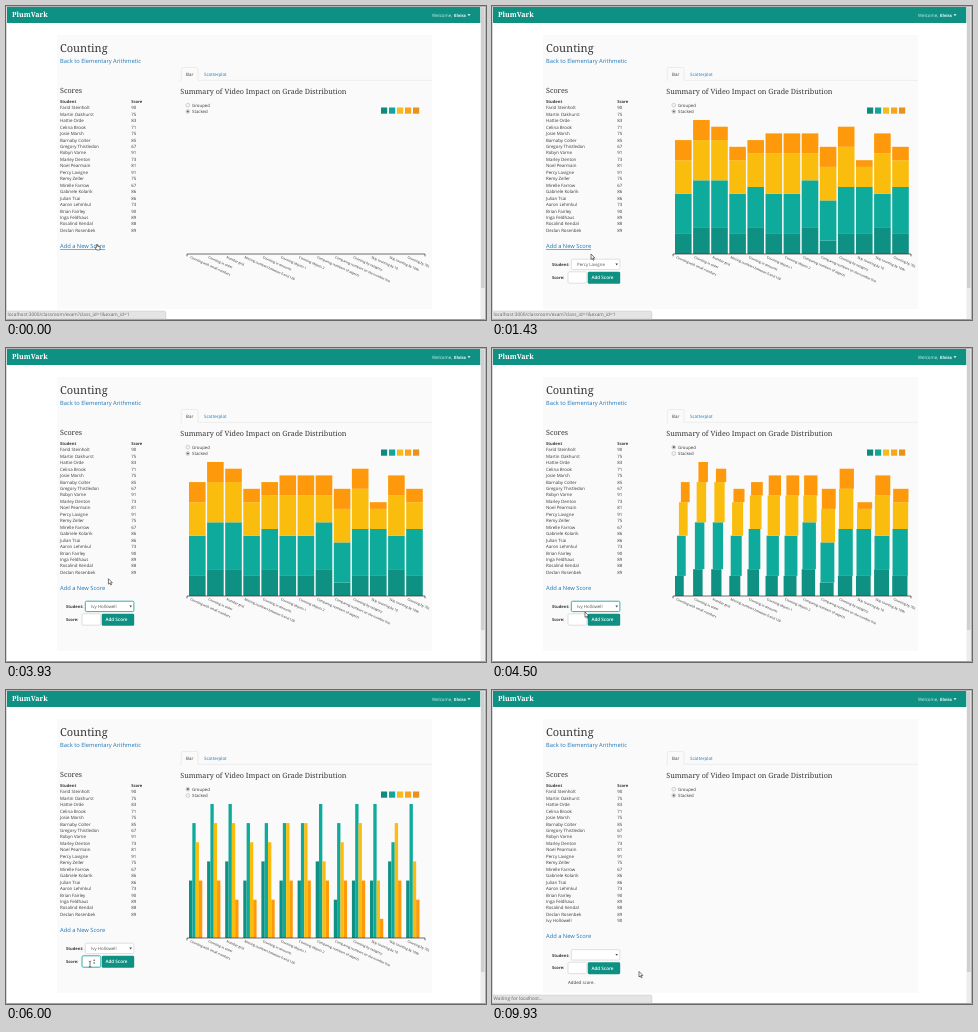
Animation of 480 by 314 pixels, one loop 10 s. Source, as an HTML page with a canvas:

```html
<!DOCTYPE html>
<html lang="en">
<head>
<meta charset="utf-8">
<title>Class scores</title>
<style>
html, body { margin: 0; width: 100%; height: 100%; overflow: hidden; background: #fff; }
canvas, svg { position: absolute; left: 0; top: 0; width: 480px; height: 314px; }
text { font-family: "Open Sans", sans-serif; text-rendering: geometricPrecision; white-space: pre; }
.serif { font-family: "Noto Serif", serif; font-weight: 500; }
</style>
</head>
<body>
<canvas id="chart"></canvas>
<svg id="ui" viewBox="0 0 480 314"></svg>
<script>
const LOOP = 10000, BASE = 248, X0 = 183, STEP = 18.1, BAR = 16.6, LEVELS = 5;
const INK = '#383838', LINK = '#1c76b8', TEAL = '#0e9183';
const COLORS = ['#0e9183', '#0eaa9b', '#fabc0d', '#fd990b'];
// Counts per topic; the fifth level is empty throughout
const DATA = ['3653', '4763', '4762', '3652', '4652', '3663', '3663',
  '4743', '2653', '3763', '3731', '4563', '3742'].map(s => [...s].map(Number));
const TOPICS = ['Counting with small numbers', 'Counting in order', 'Number grid',
  'Missing numbers between 0 and 120', 'Counting in amounts', 'Counting objects 1',
  'Counting objects 2', 'Comparing numbers of objects', 'Comparing numbers on the number line',
  'Counting by category', 'Skip counting by 10', 'Skip counting by 100s', 'Counting by 70s'];
const SCORES = [['Farid Steinholt', 90], ['Martin Oakhurst', 75], ['Hattie Orde', 83],
  ['Celina Brook', 71], ['Josie Marsh', 75], ['Barnaby Colter', 85], ['Gregory Thistledon', 67],
  ['Robyn Varne', 91], ['Marley Denton', 73], ['Noel Pearmain', 81], ['Percy Lavigne', 91],
  ['Remy Zeller', 75], ['Mirelle Farrow', 67], ['Gabriele Kolarik', 86], ['Julian Tsai', 86],
  ['Aaron Lehmkul', 73], ['Brian Fairley', 90], ['Inga Feldhaus', 89], ['Rosalind Kendal', 88],
  ['Declan Rosenbek', 89]];
const NEW_NAME = 'Ivy Hollowell';
const MENU = [10, 8, 12, 14, 18, 19, 17, 16, 5, 13, 2, 9, 7, -1, 15, 3, 0, 1, 6, 11]
  .map(i => i < 0 ? NEW_NAME : SCORES[i][0]);

// Event times in ms
const RISE = 200, FORM_ON = 700, LEAVE_LINK = 1500, MENU_ON = 1920, MENU_OFF = 3570,
  GROUP = 4235, FOCUS_SCORE = 5500, TYPE_1 = 6710, TYPE_2 = 7000, BLUR = 7860, SENT = 8250;

// time, x, y of the pointer tip
const PATH = [[0, 91, 238], [800, 91, 238], [1210, 99, 248], [1430, 99, 248], [1880, 124, 257],
  [2100, 124, 257], [2290, 123.5, 250], [2860, 123.5, 250], [3360, 108, 211], [3600, 108, 211],
  [4400, 93, 264], [4550, 93, 264], [5350, 84, 274], [7600, 84, 274], [7720, 112, 271],
  [7860, 108, 271], [8000, 104, 271], [8250, 104, 271], [9140, 145, 281], [9600, 145, 281],
  [9930, 147, 281.5], [LOOP, 147, 281.5]];

const ui = document.getElementById('ui');
function add(parent, tag, attrs) {
  const el = document.createElementNS(ui.namespaceURI, tag);
  for (const k in attrs) el.setAttribute(k, attrs[k]);
  parent.appendChild(el);
  return el;
}
const group = (parent = ui) => add(parent, 'g', {});
const rect = (p, x, y, width, height, fill, more) =>
  add(p, 'rect', { x, y, width, height, fill, ...more });
function text(p, x, y, str, size = 4.48, fill = INK, more) {
  const el = add(p, 'text', { x, y, 'font-size': size, fill, ...more });
  el.textContent = str;
  return el;
}
const show = (el, on) => el.setAttribute('visibility', on ? 'visible' : 'hidden');
const bold = { 'font-weight': 700 }, serif = { class: 'serif' };

// Header and headings
text(ui, 6, 11.4, 'PlumVark', 7.1, '#fff', { class: 'serif', style: 'font-weight: 700' });
text(ui, 426, 10.6, 'Welcome,', 4.48, '#d5efeb');
text(ui, 448, 10.6, 'Elvira', 4.3, '#fff', bold);
add(ui, 'path', { d: 'M461.5 8.2h3l-1.5 1.8z', fill: '#fff' });
text(ui, 54, 45.8, 'Counting', 11, INK, serif);
text(ui, 54, 57, 'Back to Elementary Arithmetic', 5.76, LINK);
text(ui, 54, 87.3, 'Scores', 7.2, INK, serif);
text(ui, 174.3, 87.8, 'Summary of Video Impact on Grade Distribution', 7.2, INK, serif);
add(ui, 'path', { d: 'M174 74.3H175.3V63Q175.3 61.5 176.8 61.5H190.5Q192 61.5 192 63V74.3H426',
  fill: 'none', stroke: '#ddd', 'stroke-width': .5 });
text(ui, 180, 69.6, 'Bar');
text(ui, 198, 69.6, 'Scatterplot', 4.48, LINK);

const dots = ['Grouped', 'Stacked'].map((label, i) => {
  const cy = 99.2 + i * 6.3;
  text(ui, 186, cy + 1.7, label, 4.35);
  add(ui, 'circle', { cx: 181.8, cy, r: 1.9, fill: '#f4f4f4', stroke: '#aaa', 'stroke-width': .5 });
  return add(ui, 'circle', { cx: 181.8, cy, r: 1.1, fill: '#666' });
});

// Score table
const rowY = i => 103.3 + i * 6.45;
const scoreRow = (p, i, name, score) => {
  text(p, 54, rowY(i), name, 4.4);
  text(p, 125.2, rowY(i), score, 4.4);
};
text(ui, 54, 97, 'Student', 4.1, INK, bold);
text(ui, 125.2, 97, 'Score', 4.1, INK, bold);
SCORES.forEach(([name, score], i) => scoreRow(ui, i, name, score));
const newRow = group();
scoreRow(newRow, SCORES.length, NEW_NAME, 90);

// Link and form, which move down together by one row
const lower = group();
const link = text(lower, 54, 242, 'Add a New Score', 5.76, LINK);
const form = group(lower);
text(form, 60, 260.1, 'Student:', 4.1, INK, bold);
text(form, 60, 272.8, 'Score:', 4.1, INK, bold);
const select = rect(form, 79.3, 253.2, 48.6, 10.4, '#fff', { rx: 1.3, 'stroke-width': .6 });
const chosen = text(form, 85, 260.2, '', 4.4, '#555');
add(form, 'path', { d: 'M123.4 257.6h2.6l-1.3 1.8z', fill: '#444' });
const input = rect(form, 76, 265.8, 18.8, 11.4, '#fff', { rx: 1.3, 'stroke-width': .6 });
const typed = text(form, 79.5, 273.1, '', 4.4, '#555');
const caret = rect(form, 79.7, 269, .5, 5, '#333');
const spinner = add(form, 'path', { d: 'M87 270.8l1.2-1.6 1.2 1.6zM87 272.4l1.2 1.6 1.2-1.6z', fill: '#555' });
rect(form, 95.8, 265.7, 32.4, 12, TEAL, { rx: 1.3 });
text(form, 99.4, 273.4, 'Add Score', 4.6, '#fff', { 'font-weight': 600 });
const added = text(form, 76, 287.3, 'Added score.', 4.4);

// Drop-down menu
const menu = group();
rect(menu, 79.3, 123.3, 52, 129.6, '#fff', { stroke: '#999', 'stroke-width': .5 });
rect(menu, 127, 123.6, 4, 129, '#ececec');
rect(menu, 127.4, 127, 3.2, 108, '#c4c4c4', { rx: 1.4 });
add(menu, 'path', { d: 'M127.9 126l1.1-1.5 1.1 1.5zM127.9 249.5l1.1 1.5 1.1-1.5z', fill: '#555' });
const menuRow = i => 123.9 + i * 6.45;
const hover = rect(menu, 79.6, 0, 47.4, 6.4, '#f07a35');
const items = MENU.map((name, i) => text(menu, 85, menuRow(i) + 4.8, name, 4.4));

// Axis labels and legend
const axis = group();
add(axis, 'path', { d: 'M181 250.3V248H419V250.3', fill: 'none', stroke: '#333', 'stroke-width': .7 });
TOPICS.forEach((label, i) => text(axis, 0, 0, label, 3.2, '#222', {
  transform: `translate(${X0 + i * STEP + 1} 252) rotate(24)` }));
['#0e8a7e', '#13a597', '#f6bc1c', '#f8a51b', '#e8921c'].forEach((c, i) =>
  rect(axis, 375 + i * 8, 101.5, 6.2, 6.2, c));

// Status bar
const status = group();
add(status, 'path', { d: 'M0 305H158.3Q159.8 305 159.8 306.5V313H0z', fill: '#e4e4e4', stroke: '#c4c4c4', 'stroke-width': .5 });
const statusText = text(status, 1.5, 310.2, '', 4.75, '#666');

// Pointers
const pointer = group();
const line = { stroke: '#111', 'stroke-width': .55, 'stroke-linejoin': 'round' };
const shapes = {
  arrow: add(pointer, 'path', { d: 'M0 0V5.4L1.3 4.3 2.2 6.3 3.1 5.9 2.2 4H3.9z', fill: '#fff', ...line }),
  hand: add(pointer, 'path', { d: 'M-.6 .6Q0-.4 .6 .6V2.3L2.9 2.9Q3.4 3.1 3.2 4L2.7 6H-.4L-1.9 3.8Q-1.6 2.9-.6 3.6z', fill: '#fff', ...line }),
  beam: add(pointer, 'path', { d: 'M-1.2-2.8Q0-2.8 0-2.2Q0-2.8 1.2-2.8M0-2.2V2.4M-1.2 3Q0 3 0 2.4Q0 3 1.2 3', fill: 'none', ...line })
};

const clamp = v => Math.max(0, Math.min(1, v));
const mix = (a, b, k) => a + (b - a) * k;
function ease(v) {
  v = clamp(v);
  return v < .5 ? 4 * v ** 3 : 1 - 4 * (1 - v) ** 3;
}

function pointAt(t) {
  const n = PATH.findIndex(p => p[0] > t);
  const [t0, x0, y0] = PATH[n - 1], [t1, x1, y1] = PATH[n];
  const u = (t - t0) / (t1 - t0), k = u * u * (3 - 2 * u);
  return [mix(x0, x1, k), mix(y0, y1, k)];
}

const canvas = document.getElementById('chart');
const dpr = window.devicePixelRatio || 1;
canvas.width = 480 * dpr;
canvas.height = 314 * dpr;
const ctx = canvas.getContext('2d');
function fill(x, y, w, h, color) {
  ctx.fillStyle = color;
  ctx.fillRect(x, y, w, h);
}

function drawBars(t) {
  const thin = BAR / LEVELS;
  DATA.forEach((values, i) => {
    const delay = i * 10, left = X0 + i * STEP;
    const rise = ease((t - RISE - delay) / 300);
    const split = ease((t - GROUP - delay) / 500);
    const grow = ease((t - GROUP - 500 - delay) / 500);
    let below = 0;
    values.forEach((v, j) => {
      const h = mix(v * 6.7 * rise, v * 19.15, grow);
      const bottom = BASE - below * 6.7 * rise * (1 - grow);
      fill(left + thin * j * split, bottom - h, mix(BAR, thin, split), h, COLORS[j]);
      below += v;
    });
  });
}

function drawPage(t) {
  ctx.setTransform(dpr, 0, 0, dpr, 0, 0);
  fill(0, 0, 480, 314, '#fff');
  fill(51, 29, 375, 274, '#fafafa');
  fill(1, 1, 473.5, 16, TEAL);
  // Scroll bar and window edge
  fill(474.5, 1, 4.5, 312, '#ececec');
  fill(475, 1.5, 3.5, 280.5, '#cfcfcf');
  fill(0, 0, 480, 1, '#b4b4b4');
  fill(0, 313, 480, 1, '#a0a0a0');
  fill(0, 0, .7, 314, '#c8c8c8');
  fill(479, 0, 1, 314, '#b4b4b4');
  if (t < SENT) drawBars(t);
}

function focusRing(el, on) {
  el.setAttribute('stroke', on ? '#25a59a' : '#ccc');
  el.setAttribute('stroke-width', on ? .9 : .6);
}

function drawUi(t) {
  const sent = t >= SENT, grouped = t >= GROUP && !sent;
  show(dots[0], grouped);
  show(dots[1], !grouped);
  show(axis, !sent);
  show(newRow, sent);
  show(added, sent);
  lower.setAttribute('transform', `translate(0 ${sent ? 6.45 : 0})`);
  link.setAttribute('text-decoration', t < LEAVE_LINK ? 'underline' : 'none');
  form.setAttribute('display', t >= FORM_ON ? 'inline' : 'none');
  chosen.textContent = sent ? '' : t < MENU_OFF ? SCORES[10][0] : NEW_NAME;

  const typing = t >= FOCUS_SCORE && t < BLUR;
  focusRing(select, t >= MENU_ON && t < FOCUS_SCORE);
  focusRing(input, typing);
  const value = sent || t < TYPE_1 ? '' : t < TYPE_2 ? '9' : '90';
  typed.textContent = value;
  caret.setAttribute('x', 79.7 + value.length * 2.55);
  show(caret, typing && (t < FOCUS_SCORE + 500 || (t >= TYPE_1 && t < 7500)));
  show(spinner, t >= 5350 && t < 7640);

  const [x, y] = pointAt(t);
  const open = t >= MENU_ON && t < MENU_OFF;
  menu.setAttribute('display', open ? 'inline' : 'none');
  if (open) {
    const at = Math.max(0, Math.min(19, Math.floor((y - 123.9) / 6.45)));
    hover.setAttribute('y', menuRow(at));
    items.forEach((el, i) => el.setAttribute('fill', i === at ? '#fff' : INK));
  }

  show(status, t < LEAVE_LINK + 100 || sent);
  statusText.textContent = sent ? 'Waiting for localhost...' : 'localhost:3000/classroom/exam?class_id=1&exam_id=1';

  const kind = t < 1000 || (t >= 7640 && t < SENT + 150) ? 'hand' : t >= 5350 && t < 7640 ? 'beam' : 'arrow';
  for (const k in shapes) show(shapes[k], k === kind);
  pointer.setAttribute('transform', `translate(${x} ${y})`);
}

function frame() {
  const t = performance.now() % LOOP;
  drawPage(t);
  drawUi(t);
  requestAnimationFrame(frame);
}
frame();
</script>
</body>
</html>
```
